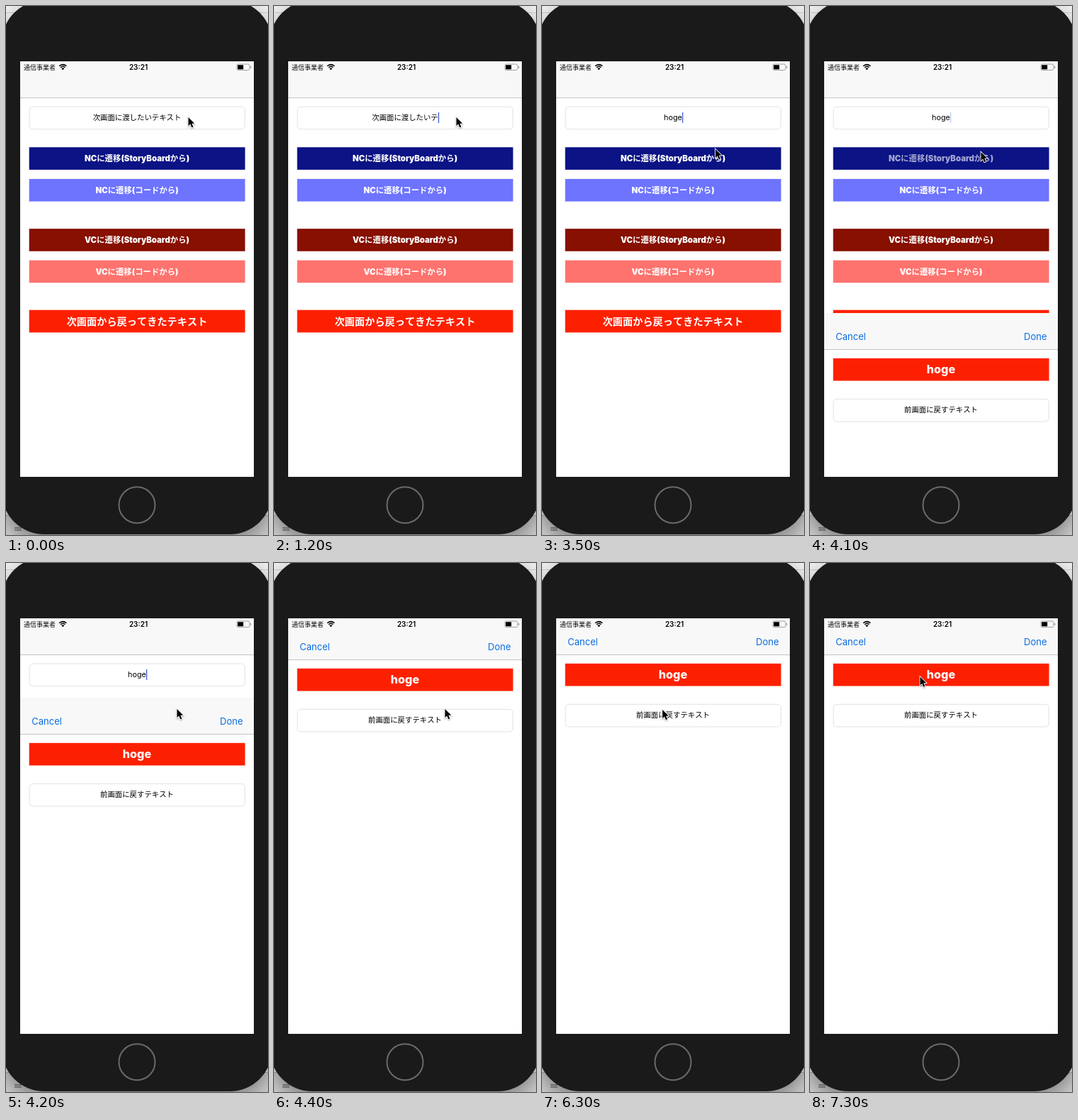
These frames come from a looping animation (370 by 746 pixels, 7.4 s). An HTML page with a canvas:

```html
<!DOCTYPE html>
<html lang="ja">
<head>
<meta charset="utf-8">
<title>画面遷移</title>
<style>
html, body { margin: 0; width: 100%; height: 100%; overflow: hidden; background: #fff; }
canvas { display: block; width: 370px; height: 746px; }
</style>
</head>
<body>
<canvas id="stage"></canvas>
<script>
const W = 370, H = 746, LOOP = 7400, STEP = 100;
const SCREEN = { x: 20, y: 78, w: 330, h: 586 };
const FONT = 'Inter, "Noto Sans CJK JP", "Noto Sans CJK", sans-serif';
const INITIAL = '次画面に渡したいテキスト';
const TYPED = 'hoge';
const RED = '#fd2000', BLUE = '#0a6ce0';
const BOX = { x: 32.7, w: 304.9, h: 31.7 };

const canvas = document.getElementById('stage');
const ratio = window.devicePixelRatio || 1;
canvas.width = W * ratio;
canvas.height = H * ratio;
const ctx = canvas.getContext('2d');

// Pointer path: time, x, y
const PATH = [
  [3200, 257.5, 157], [3500, 245, 202], [3800, 241.5, 206], [5400, 241.5, 206],
  [5700, 217, 254], [5900, 198, 270], [6200, 172, 212], [7000, 157, 171], [7300, 155.5, 160.5]
];

const clamp = v => Math.max(0, Math.min(1, v));

function pointerAt(t) {
  if (t <= PATH[0][0]) return PATH[0].slice(1);
  const i = PATH.findIndex(p => p[0] >= t);
  if (i < 0) return PATH[PATH.length - 1].slice(1);
  const [t0, x0, y0] = PATH[i - 1], [t1, x1, y1] = PATH[i];
  const k = (t - t0) / (t1 - t0);
  return [x0 + (x1 - x0) * k, y0 + (y1 - y0) * k];
}

function fieldText(t) {
  if (t < 2500) {
    const removed = Math.max(0, Math.floor((t - 900) / 100));
    return INITIAL.slice(0, Math.max(0, INITIAL.length - removed));
  }
  return TYPED.slice(0, Math.max(0, Math.floor((t - 2400) / 200)));
}

function caretAlpha(t) {
  if (t < 900) return 0;
  if (t < 3200) return 1;
  const p = (t - 3200) % 1000;
  return p < 500 ? 1 : Math.max(clamp((700 - p) / 200), clamp((p - 850) / 150));
}

// Critically damped slide of the sheet
function sheetOffset(t) {
  const u = Math.max(0, t - 4020) * 0.017;
  return Math.round(SCREEN.h * (1 + u) * Math.exp(-u));
}

function rect(x, y, w, h, color) {
  ctx.fillStyle = color;
  ctx.fillRect(x, y, w, h);
}

function text(str, x, y, size, weight, color, align = 'center') {
  ctx.font = `${weight} ${size}px ${FONT}`;
  ctx.textAlign = align;
  ctx.fillStyle = color;
  ctx.fillText(str, x, y + size * 0.37);
  return ctx.measureText(str).width;
}

function button(y, color, label, alpha = 1) {
  rect(BOX.x, y, BOX.w, BOX.h, color);
  text(label, 185, y + 16, 11.4, 900, `rgba(255,255,255,${alpha})`);
}

function field(y) {
  ctx.beginPath();
  ctx.roundRect(BOX.x + 0.3, y, BOX.w - 0.6, BOX.h, 5);
  ctx.fillStyle = '#fff';
  ctx.fill();
  ctx.strokeStyle = '#e2e2e2';
  ctx.lineWidth = 1;
  ctx.stroke();
}

function navBar() {
  rect(SCREEN.x, SCREEN.y, SCREEN.w, 51, '#f8f8f8');
  rect(SCREEN.x, 129, SCREEN.w, 1, '#c4c4c4');
}

function device() {
  rect(0, 0, W, H, '#f4f4f4');
  rect(0, 9, W, 1, '#d2d2d2');
  rect(0, 718, W, H - 718, '#dcdcdc');
  rect(0, 718, W, 1, '#b4b4b4');
  for (let i = 0; i < 3; i++) rect(12, 735 + i * 2, 10, 1, '#777');
  ctx.save();
  ctx.shadowColor = 'rgba(0,0,0,0.45)';
  ctx.shadowBlur = 36 * ratio;
  ctx.shadowOffsetY = 14 * ratio;
  ctx.beginPath();
  ctx.roundRect(-6, -8, 382, 753, 60);
  ctx.fillStyle = '#1a1a1a';
  ctx.fill();
  ctx.restore();
  ctx.beginPath();
  ctx.arc(185, 703.8, 25.5, 0, Math.PI * 2);
  ctx.strokeStyle = '#6a6a6a';
  ctx.lineWidth = 2;
  ctx.stroke();
}

function statusBar() {
  text('通信事業者', 25, 86.5, 9, 400, '#111', 'left');
  text('23:21', 187, 86.5, 10, 600, '#000');
  ctx.strokeStyle = '#000';
  ctx.lineWidth = 1.6;
  for (const r of [4.2, 7]) {
    ctx.beginPath();
    ctx.arc(80.3, 89.6, r, -Math.PI * 0.76, -Math.PI * 0.24);
    ctx.stroke();
  }
  ctx.beginPath();
  ctx.moveTo(80.3, 90.2);
  ctx.arc(80.3, 90.2, 2.8, -Math.PI * 0.76, -Math.PI * 0.24);
  ctx.fillStyle = '#000';
  ctx.fill();
  ctx.beginPath();
  ctx.roundRect(326, 82, 18, 8.5, 2);
  ctx.strokeStyle = '#999';
  ctx.lineWidth = 0.9;
  ctx.stroke();
  rect(327.2, 83.2, 8, 6.1, '#000');
  rect(345, 84.8, 1.2, 3, '#999');
}

function mainScreen(t) {
  navBar();
  field(142);
  const str = fieldText(t);
  const w = text(str, 185, 157.5, t < 2500 ? 10.4 : 10.8, 400, '#000');
  ctx.globalAlpha = caretAlpha(t);
  rect(185 + w / 2, 150, 1.4, 15, '#4a63dc');
  ctx.globalAlpha = 1;
  button(199.2, '#0b1385', 'NCに遷移(StoryBoardから)', t >= 3900 ? 0.62 : 1);
  button(243.9, '#6e74fe', 'NCに遷移(コードから)');
  button(314.1, '#871000', 'VCに遷移(StoryBoardから)');
  button(358.6, '#fe736e', 'VCに遷移(コードから)');
  rect(BOX.x, 428.7, BOX.w, BOX.h, RED);
  text('次画面から戻ってきたテキスト', 185, 444.5, 14.2, 700, '#fff');
}

function sheet(offset) {
  ctx.save();
  ctx.translate(0, offset);
  rect(SCREEN.x, SCREEN.y, SCREEN.w, SCREEN.h, '#fff');
  navBar();
  text('Cancel', 36.3, 111.5, 13, 400, BLUE, 'left');
  text('Done', 334.5, 111.5, 13, 400, BLUE, 'right');
  rect(BOX.x, 141.8, BOX.w, BOX.h, RED);
  text(TYPED, 185, 157.5, 16.2, 800, '#fff');
  field(199.3);
  text('前画面に戻すテキスト', 185, 214.5, 10.4, 400, '#000');
  ctx.restore();
}

function pointer(x, y) {
  ctx.save();
  ctx.translate(x, y);
  ctx.scale(0.86, 0.86);
  ctx.beginPath();
  ctx.moveTo(0, 0);
  ctx.lineTo(0, 14);
  ctx.lineTo(3.2, 11.1);
  ctx.lineTo(5.6, 16.6);
  ctx.lineTo(8, 15.6);
  ctx.lineTo(5.7, 10.3);
  ctx.lineTo(10, 10);
  ctx.closePath();
  ctx.shadowColor = 'rgba(0,0,0,0.35)';
  ctx.shadowBlur = 2 * ratio;
  ctx.shadowOffsetY = ratio;
  ctx.strokeStyle = '#fff';
  ctx.lineWidth = 2;
  ctx.stroke();
  ctx.shadowColor = 'transparent';
  ctx.fillStyle = '#000';
  ctx.fill();
  ctx.restore();
}

function draw(t) {
  ctx.setTransform(ratio, 0, 0, ratio, 0, 0);
  device();
  ctx.save();
  ctx.beginPath();
  ctx.rect(SCREEN.x, SCREEN.y, SCREEN.w, SCREEN.h);
  ctx.clip();
  rect(SCREEN.x, SCREEN.y, SCREEN.w, SCREEN.h, '#fff');
  mainScreen(t);
  if (t > 4020) sheet(sheetOffset(t));
  statusBar();
  ctx.restore();
  pointer(...pointerAt(t));
}

const start = performance.now();
function tick() {
  const t = (performance.now() - start) % LOOP;
  draw(Math.floor(t / STEP) * STEP);
  requestAnimationFrame(tick);
}
tick();
</script>
</body>
</html>
```
